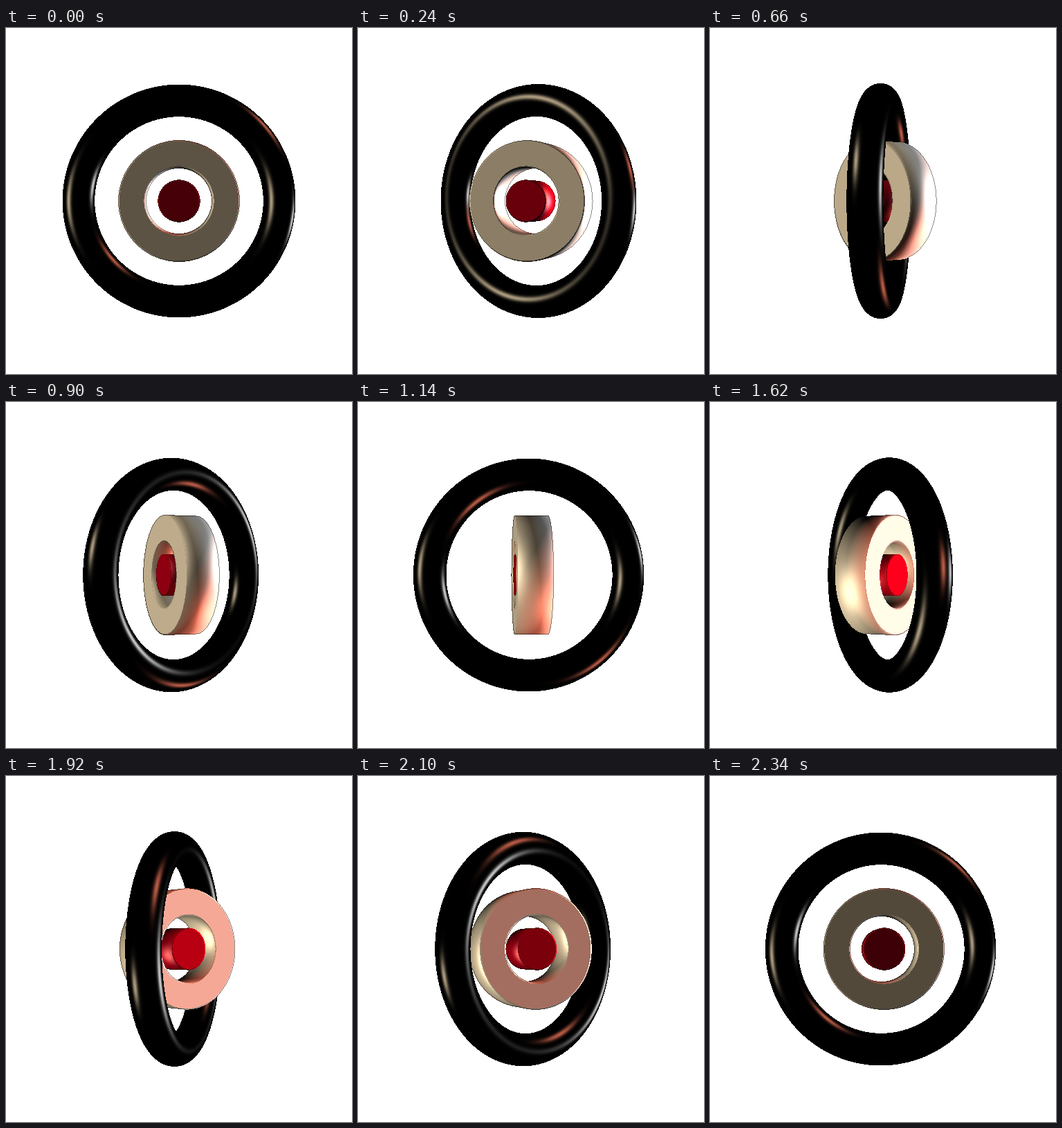
Recreate the animation shown at these times as an HTML page with a canvas. Size 500 px wide and 500 px high, loop 2400 ms.

```html
<!DOCTYPE html>
<html>
<head>
<meta charset="utf-8">
<style>
  html, body { margin: 0; width: 100%; height: 100%; overflow: hidden; background: #fff; }
  canvas { display: block; position: absolute; left: 75px; top: 75px; }
</style>
</head>
<body>
<canvas id="view" width="350" height="350"></canvas>
<script>
const SIZE = 350, STEPS = 40, STEP_MS = 60;
const CAMERA = 1100;
const MAJOR = 145, TUBE = 23;
const OUTER = 86, HOLE = 48, CORE = 30, HALF = 24, BEVEL = 1.5;
const SIDE_TILT = 0.55;       // side normals lean outwards near the rims
const HIGHLIGHT_LEAN = 1.22;  // pulls highlights towards the light
const RADII = [OUTER, HOLE, CORE];
const WHITE = [1, 1, 1], RED = [0.75, 0, 0.12], BLACK = [0, 0, 0];

const ctx = document.getElementById('view').getContext('2d');
const frames = [];

// Beige from the left, white from the right, salmon circling on the right.
function lightsAt(phase) {
  return [
    { dir: [-0.87, 0.5 * Math.sin(phase), 0.48], color: [191, 173, 141] },
    { dir: [0.97, 0.18 * Math.sin(phase - 1.22), -0.2], color: [225, 225, 225] },
    { dir: [0.7, 0.75 * Math.cos(phase + 0.61), 0.1 - 0.45 * Math.cos(phase - 1.1)], color: [205, 101, 77] }
  ];
}

// Camera ray in the frame of a body turned about the vertical axis.
function localRay(px, py, c, s) {
  return [px * c - CAMERA * s, py, -px * s - CAMERA * c];
}

const toWorld = (n, c, s) => [n[0] * c - n[2] * s, n[1], n[0] * s + n[2] * c];

function hitTorus(px, py, c, s) {
  const [dx, dy, dz] = localRay(px, py, c, s);
  const len = Math.hypot(dx, dy, dz);
  const bound = MAJOR + TUBE + 1;
  const mid = CAMERA * CAMERA / len;
  const gap = bound * bound - (CAMERA * CAMERA - mid * mid);
  if (gap <= 0) return null;
  const end = mid + Math.sqrt(gap);
  let dist = mid - Math.sqrt(gap);
  while (dist < end) {
    const t = dist / len;
    const x = CAMERA * s + dx * t, y = dy * t, z = CAMERA * c + dz * t;
    const rho = Math.sqrt(x * x + y * y), q = rho - MAJOR;
    const fromCore = Math.sqrt(q * q + z * z);
    if (fromCore - TUBE < 0.1) {
      const k = q / fromCore / rho;
      return { t, normal: toWorld([x * k, y * k, z / fromCore], c, s), albedo: BLACK, gloss: 0.9, power: 70 };
    }
    dist += fromCore - TUBE;
  }
  return null;
}

function capNormal(x, y, rho, side) {
  let tilt = 0;
  if (rho > OUTER - BEVEL || (rho < CORE && rho > CORE - BEVEL)) tilt = 0.7;
  else if (rho >= HOLE && rho < HOLE + BEVEL) tilt = -0.7;
  return tilt ? [x / rho * tilt, y / rho * tilt, side * 0.714] : [0, 0, side];
}

// Thick ring with a separate core, both centred on the same axis.
function hitRing(px, py, c, s) {
  const [dx, dy, dz] = localRay(px, py, c, s);
  const ox = CAMERA * s, oz = CAMERA * c;
  let t = Infinity, normal, albedo, gloss = 0;

  const side = Math.sign(oz);
  const capT = (side * HALF - oz) / dz;
  const cx = ox + dx * capT, cy = dy * capT, rho = Math.hypot(cx, cy);
  if (capT > 0 && rho < OUTER && (rho > HOLE || rho < CORE)) {
    t = capT;
    normal = capNormal(cx, cy, rho, side);
    albedo = rho < CORE ? RED : WHITE;
  }

  const a = dx * dx + dy * dy, b = ox * dx;
  for (const radius of RADII) {
    const disc = b * b - a * (ox * ox - radius * radius);
    if (disc < 0) continue;
    const root = Math.sqrt(disc);
    for (const sign of [-1, 1]) {
      const sideT = (-b + sign * root) / a;
      const z = oz + dz * sideT;
      if (sideT <= 0 || sideT >= t || Math.abs(z) > HALF) continue;
      t = sideT;
      const lean = SIDE_TILT * z / HALF;
      const k = -sign * Math.sqrt(1 - lean * lean) / radius;
      normal = [k * (ox + dx * t), k * dy * t, lean];
      albedo = radius === CORE ? RED : WHITE;
      gloss = 0.65;
    }
  }
  return normal && { t, normal: toWorld(normal, c, s), albedo, gloss, power: 14 };
}

const dot = (a, b) => a[0] * b[0] + a[1] * b[1] + a[2] * b[2];

function shade(hit, px, py, lights) {
  const len = Math.hypot(px, py, CAMERA);
  const view = [-px / len, -py / len, CAMERA / len];
  const rgb = [0, 0, 0];
  for (const { dir, color } of lights) {
    const diffuse = Math.max(0, dot(hit.normal, dir));
    let spec = 0;
    if (hit.gloss) {
      const half = dir.map((d, i) => d * HIGHLIGHT_LEAN + view[i]);
      const facing = dot(hit.normal, half) / Math.hypot(...half);
      if (facing > 0) spec = hit.gloss * facing ** hit.power;
    }
    for (let i = 0; i < 3; i++) rgb[i] += color[i] * (diffuse * hit.albedo[i] + spec);
  }
  return rgb;
}

// Thin dark fringe where a body meets the background.
function darkenEdges(data) {
  const row = SIZE * 4;
  for (let i = row; i < data.length - row; i += 4) {
    if (!data[i + 3]) continue;
    if (data[i - 1] && data[i + 7] && data[i + 3 - row] && data[i + 3 + row]) continue;
    for (let k = 0; k < 3; k++) data[i + k] *= 0.55;
  }
}

function render(step) {
  const phase = step / STEPS * 2 * Math.PI;
  const lights = lightsAt(phase);
  const c = Math.cos(phase), s = Math.sin(phase);
  const ringC = Math.cos(phase / 2), ringS = Math.sin(phase / 2);
  const image = ctx.createImageData(SIZE, SIZE);
  let i = 0;
  for (let y = 0; y < SIZE; y++) {
    for (let x = 0; x < SIZE; x++, i += 4) {
      const px = x + 0.5 - SIZE / 2, py = SIZE / 2 - y - 0.5;
      const torus = hitTorus(px, py, c, s);
      const ring = Math.hypot(px, py) < 100 && hitRing(px, py, ringC, ringS);
      const hit = torus && ring ? (torus.t < ring.t ? torus : ring) : torus || ring;
      if (!hit) continue;
      const rgb = shade(hit, px, py, lights);
      for (let k = 0; k < 3; k++) image.data[i + k] = rgb[k];
      image.data[i + 3] = 255;
    }
  }
  darkenEdges(image.data);
  return image;
}

let shown = -1;
function draw() {
  const step = Math.floor(performance.now() / STEP_MS) % STEPS;
  if (step !== shown) {
    frames[step] = frames[step] || render(step);
    ctx.putImageData(frames[step], 0, 0);
    shown = step;
  }
  requestAnimationFrame(draw);
}
draw();
</script>
</body>
</html>
```
